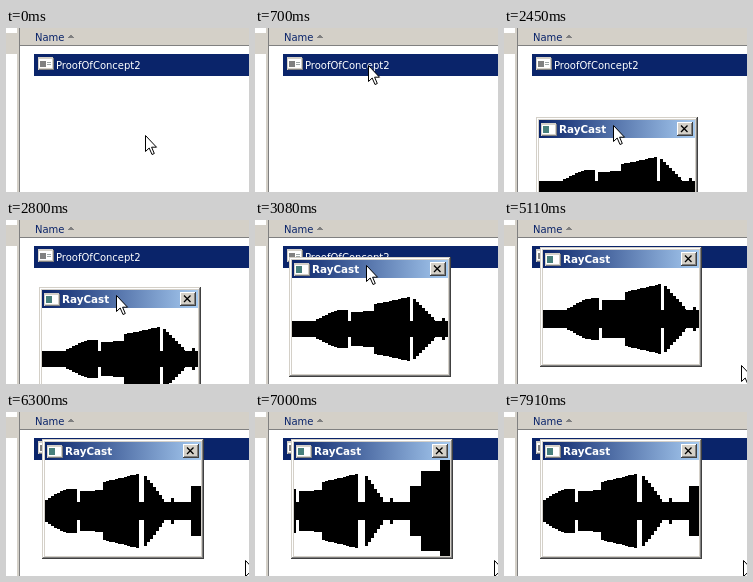
These frames come from a looping animation (243x164 px, 8 s). An HTML page:

```html
<!DOCTYPE html>
<html lang="en">
<head>
<meta charset="utf-8">
<title>RayCast</title>
<style>
  html, body { margin: 0; width: 100%; height: 100%; overflow: hidden; background: #fff; }
  svg { display: block; }
  #stage { width: 100vw; height: 100vh; }
  text { font: 10px "DejaVu Sans", sans-serif; }
  .title { font-size: 10.4px; font-weight: bold; }
  .face { fill: #d4d0c8; }
  .mid { fill: #808080; }
  .dark { fill: #404040; }
  .light { fill: #fff; }
  .navy { fill: #0a246a; }
</style>
</head>
<body>
<svg id="stage" viewBox="0 0 243 164" shape-rendering="crispEdges">
  <defs>
    <linearGradient id="caption">
      <stop offset="0" stop-color="#0a246a"/>
      <stop offset="1" stop-color="#a6caf0"/>
    </linearGradient>
    <g id="frame">
      <rect class="face" width="15" height="13"/>
      <rect class="mid" x="1" y="12" width="15" height="1"/>
      <rect class="mid" x="15" y="1" width="1" height="12"/>
      <rect class="light" x="1" y="2" width="13" height="9"/>
    </g>
  </defs>

  <rect class="light" width="243" height="164"/>
  <rect class="face" y="5" width="11" height="21"/>
  <rect class="face" x="11" width="2" height="164"/>
  <rect class="mid" x="13" width="1" height="164"/>
  <rect class="face" x="14" width="229" height="17"/>
  <rect class="mid" x="14" y="17" width="229" height="1"/>
  <text class="navy" x="29" y="13">Name</text>
  <path class="mid" d="M65 6l3 4h-6z"/>

  <rect class="navy" x="28" y="26" width="215" height="22"/>
  <g transform="translate(32 29)">
    <use href="#frame"/>
    <rect class="mid" x="2" y="4" width="6" height="6"/>
    <path d="M9 5h4v1h-4zM9 7h4v1h-4z" fill="#a0a8a8"/>
  </g>
  <text class="light" x="50" y="41">ProofOfConcept2</text>

  <g id="window">
    <rect class="dark" width="162" height="120"/>
    <rect class="face" width="161" height="119"/>
    <rect class="mid" x="1" y="1" width="160" height="118"/>
    <rect class="light" x="1" y="1" width="159" height="117"/>
    <rect class="face" x="2" y="2" width="158" height="116"/>
    <rect x="3" y="3" width="156" height="18" fill="url(#caption)"/>
    <g transform="translate(5 6)">
      <use href="#frame"/>
      <rect x="2" y="3" width="6" height="7" fill="#48807c"/>
    </g>
    <text class="light title" x="23" y="16">RayCast</text>
    <rect class="dark" x="141" y="5" width="16" height="14"/>
    <rect class="light" x="141" y="5" width="15" height="13"/>
    <rect class="mid" x="142" y="6" width="14" height="12"/>
    <rect class="face" x="142" y="6" width="13" height="11"/>
    <path d="M145 8.5l6.5 6.5M151.5 8.5l-6.5 6.5" stroke="#000" stroke-width="1.3" shape-rendering="auto"/>
    <svg x="3" y="21" width="156" height="96" overflow="hidden">
      <rect class="light" width="156" height="96"/>
      <path id="view"/>
    </svg>
  </g>

  <path id="cursor" d="M.5.5V16.5L4.2 13L7 19.5L9.3 18.5L6.6 12.2H11.5Z"
        fill="#fff" stroke="#000" shape-rendering="auto"/>
</svg>

<script>
const LOOP = 8000, TICK = 70;
const OPEN = 1820, DRAG_START = 2600, DRAG_END = 3500;
const VIEW_WIDTH = 156, HORIZON = 51, CORRIDOR = 8.5, TURN = 3;

const moves = [
  { from: 0, to: 0, x: 139, y: 107 },
  { from: 70, to: 70, x: 139, y: 109 },
  { from: 280, to: 700, x: 113, y: 37 },
  { from: 2100, to: 2450, x: 109, y: 97 },
  { from: 2660, to: 3080, x: 111, y: 45 },
  { from: 3150, to: 3430, x: 113, y: 35 },
  { from: 3710, to: 3920, x: 132, y: 79 },
  { from: 4340, to: 4550, x: 132, y: 101 },
  { from: 4760, to: 5110, x: 237, y: 145 },
  { from: 5390, to: 5460, x: 239, y: 148 }
];

// key points: time, value
const turnKeys = [[5320, 0], [6300, 24], [7000, 54], [7280, 54], [7350, 51], [7700, 51], [7910, 24]];
const zoomKeys = [[4900, .92], [5110, 1]];

// A flat wall projects to a straight edge: left, its half height, right, its half height.
const wallsAt = turn => [
  [24, 10, 42, 20],
  [42, 20, 56, 21],
  [59, 18.5, 82, 19.5],
  [82, 27, 118, 35],
  [121 + turn * .07, 34, 143, 10],
  [150, 12, 153, 12],
  [170, 23, 181, 23],
  [181, 37, 200, 37],
  [200, 50, 260, 50]
];

const byId = id => document.getElementById(id);
const place = (node, [x, y]) => node.setAttribute("transform", `translate(${x} ${y})`);
const mix = (a, b, part) => a + (b - a) * Math.min(1, Math.max(0, part));

function valueAt(keys, t) {
  const next = keys.findIndex(([time]) => time > t);
  if (next < 0) return keys.at(-1)[1];
  const [t1, v1] = keys[next], [t0, v0] = keys[Math.max(0, next - 1)];
  return next ? mix(v0, v1, (t - t0) / (t1 - t0)) : v1;
}

function cursorAt(t) {
  const i = moves.findLastIndex(move => move.from <= t);
  const move = moves[i], last = moves[Math.max(0, i - 1)];
  const part = (t - move.from + TICK) / (move.to - move.from + TICK);
  return [mix(last.x, move.x, part), mix(last.y, move.y, part)].map(Math.round);
}

function windowAt(t) {
  const [x, y] = cursorAt(Math.min(DRAG_END, Math.max(DRAG_START, t)));
  return [x - 77, y - 8];
}

function viewPath(t) {
  const turn = Math.round(valueAt(turnKeys, t) / TURN) * TURN;
  const scale = valueAt(zoomKeys, t) + Math.min(.07, turn * .003);
  const walls = wallsAt(turn);
  let path = "";
  for (let x = 0; x < VIEW_WIDTH; x++) {
    const angle = x + turn;
    const wall = walls.find(([left, , right]) => left <= angle && angle < right);
    let half = CORRIDOR;
    if (wall) {
      const [left, start, right, end] = wall;
      const step = Math.floor((angle - left) / 3) * 3 + 1;
      half = mix(start, end, step / (right - left));
    }
    half = Math.round(half * scale);
    path += `M${x} ${HORIZON - half}h1v${half * 2}h-1z`;
  }
  return path;
}

function draw(now) {
  const t = Math.floor(now % LOOP / TICK) * TICK;
  byId("window").style.display = t < OPEN ? "none" : "";
  place(byId("window"), windowAt(t));
  place(byId("cursor"), cursorAt(t));
  byId("view").setAttribute("d", viewPath(t));
}

const begin = performance.now();
function frame() {
  draw(performance.now() - begin);
  requestAnimationFrame(frame);
}
frame();
</script>
</body>
</html>
```
